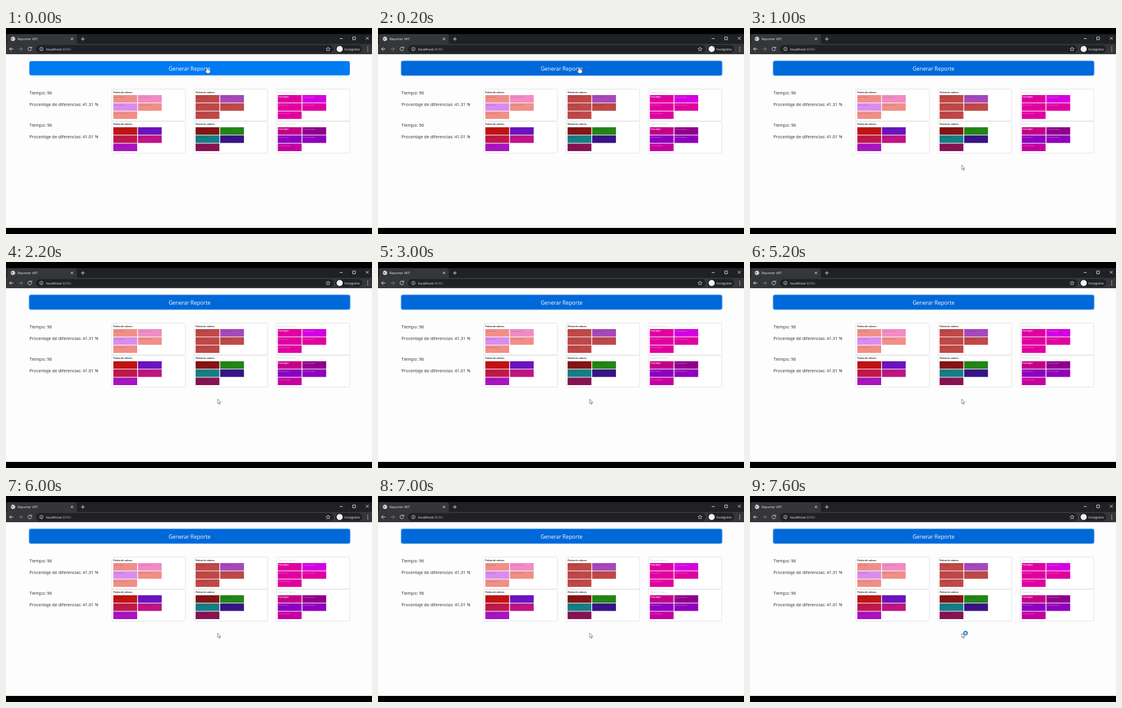
An HTML page for the animation above (8000 ms loop, 600 px wide and 338 px high).

```html
<!DOCTYPE html>
<html lang="es">
<head>
<meta charset="utf-8">
<title>Reporter VRT</title>
<style>
  html, body { margin: 0; width: 100%; height: 100%; overflow: hidden; background: #000; }
  svg { display: block; width: 100%; height: 100%; font-family: "Open Sans", "Noto Sans", sans-serif; }
  .icon { fill: none; stroke: #e4e5e8; stroke-width: .9; }
  .body { font-size: 7.08px; fill: #25292d; }
</style>
</head>
<body>
<svg viewBox="0 0 600 338">
  <rect width="600" height="338"/>
  <rect y="10" width="600" height="18" fill="#202124"/>
  <path d="M0 26Q2 26 2 24V13Q2 10 5 10H113Q116 10 116 13V24Q116 26 118 26H600V43H0Z" fill="#35363a"/>
  <rect y="43" width="600" height="285" fill="#fdfdfd"/>

  <!-- Tab strip -->
  <circle cx="11.5" cy="17.8" r="3.5" fill="#e4e5e8"/>
  <path d="M9 16.2l2 .6 .4 1.7-1.5 .7zM12.4 15l1.8 1.2-1 1.4zM12.3 19l1.5 .2-1.2 1.2z" fill="#4a4b50"/>
  <text x="19" y="19.8" font-size="5.4" fill="#e8eaed">Reporter VRT</text>
  <path class="icon" d="M106.3 16l3.8 3.8m0-3.8l-3.8 3.8M123 18h6m-3-3v6"/>
  <path class="icon" stroke-width=".7" d="M547 17.3h5M568.5 14.8h4.4v4.4h-4.4zM590 14.5l4.6 4.6m0-4.6l-4.6 4.6"/>

  <!-- Toolbar -->
  <rect x="49" y="28" width="488" height="13" rx="6.5" fill="#202124"/>
  <path class="icon" d="M12 34.5H5.8m3-3l-3 3 3 3"/>
  <path class="icon" style="stroke:#85878b" d="M20.8 34.5H27m-3-3l3 3-3 3"/>
  <path class="icon" d="M41.4 32.3A3 3 0 1 0 42 35.2M42.1 30.8v2.3h-2.3"/>
  <circle class="icon" cx="58" cy="34.5" r="2.8" style="stroke-width:.7"/>
  <path class="icon" style="stroke-width:.8" d="M58 32.7v.8m0 .6v2.2"/>
  <text x="65.7" y="36.7" font-size="6.1" fill="#f1f3f4">localhost<tspan fill="#93969b">:8080</tspan></text>
  <path class="icon" style="stroke-width:.7" d="M528 31.2l1 2.2 2.4 .2-1.8 1.6 .5 2.4-2.1-1.3-2.1 1.3 .5-2.4-1.8-1.6 2.4-.2z"/>
  <rect x="540.5" y="28" width="43.5" height="13" rx="6.5" fill="#202124"/>
  <circle cx="547" cy="34.5" r="5" fill="#f1f3f4"/>
  <text x="555" y="36.6" font-size="5.75" fill="#f1f3f4">Incógnito</text>
  <g fill="#e4e5e8"><circle cx="593" cy="31.5" r=".8"/><circle cx="593" cy="34.5" r=".8"/><circle cx="593" cy="37.5" r=".8"/></g>

  <!-- Page -->
  <rect id="ring" x="37.2" y="53.2" width="527.6" height="25.6" rx="3.5" fill="#80bdff"/>
  <rect id="button" x="38.7" y="54.7" width="524.6" height="22.6" rx="2.3" stroke-width=".7"/>
  <text x="301" y="69.6" font-size="8.8" text-anchor="middle" fill="#fff">Generar Reporte</text>
  <g id="report"></g>

  <!-- Pointer -->
  <g id="pointer" stroke="#444" stroke-width=".6" stroke-linejoin="round" fill="#fff">
    <path id="hand" d="M-1 .6Q0-.5 1 .6V3.4Q2 2.8 2.6 3.7Q3.6 3.2 4 4.1Q5.2 3.8 5.2 5V7L4.3 9.2H-.3L-2.8 5.9Q-3-.1+5-1 5.7Z"/>
    <path id="arrow" d="M0 0V7.4L1.7 5.9L2.9 8.6L4 8.1L2.9 5.5H5.1Z"/>
    <circle id="busy" cx="6.2" cy="0" r="2.8" fill="none" stroke="#1d78cf" stroke-width="1.9"/>
  </g>
</svg>
<script>
const $ = id => document.getElementById(id);
const LOOP = 8000, STEP = 200;

const rows = [
  { diff: "41.31", palettes: [
    ["#f08f88", "#f08bc6", "#d98cf0", "#f08f88", "#f08f88"],
    ["#bf4848", "#a648bb", "#bf4848", "#bf4848", "#bf4848"],
    ["#e000a0", "#d400e0", "#e000a0", "#e000a0", "#e000a0"]] },
  { diff: "41.01", palettes: [
    ["#c01414", "#6a14c0", "#c0184a", "#c01484", "#a814c0"],
    ["#861414", "#228614", "#147e86", "#381486", "#861454"],
    ["#c40088", "#90008c", "#8c00c0", "#9000bc", "#c400a0"]] }
];
const labels = ["Fondo página", "Color secundario", "Texto principal", "Texto secundario", "Color secundario"];

function card(colors, x, y, inverted) {
  const swatches = colors.map((color, i) => {
    const sx = x + 2.3 + (i % 2) * 40.3, sy = y + 10 + (i >> 1) * 13.4;
    return `<rect x="${sx}" y="${sy}" width="39" height="12.4" fill="${color}"/>
      <text x="${sx + 1}" y="${sy + 4}" font-size="2.5" font-weight="${inverted && !i ? 700 : 400}"
        fill="${inverted ? "#fff" : "#000"}" opacity="${inverted ? .85 : .5}">${labels[i]}</text>`;
  }).join("");
  return `<rect x="${x}" y="${y + .3}" width="120.4" height="52.2" rx="1.5" fill="#fff" stroke="#dcdcdc" stroke-width=".8"/>
    <text x="${x + 2.4}" y="${y + 6.6}" font-size="3.65" font-weight="${inverted ? 400 : 700}"
      fill="${inverted ? "#c4c4c4" : "#222"}">Paleta de colores</text>${swatches}`;
}

$("report").innerHTML = rows.map(({ diff, palettes }, r) => {
  const y = 100 + r * 52.8;
  return `<text class="body" x="38.6" y="${y + 8.8}">Tiempo: 96</text>
    <text class="body" x="38.6" y="${y + 28}">Procentaje de diferencias: ${diff} %</text>` +
    palettes.map((p, c) => card(p, 173.7 + c * 134.8, y, c === 2)).join("");
}).join("");

$("hand").setAttribute("d", "M-1 .6Q0-.5 1 .6V3.4Q2 2.8 2.6 3.7Q3.6 3.2 4 4.1Q5.2 3.8 5.2 5V7L4.3 9.2H-.3L-2.8 5.9Q-2.4 4.6-1 5.7Z");

const show = (id, on) => $(id).setAttribute("visibility", on ? "visible" : "hidden");

function draw(now) {
  const t = Math.floor((now % LOOP) / STEP) * STEP;
  const p = Math.min(1, Math.max(0, (t - 200) / 600));
  const ease = p * p * (3 - 2 * p);
  const x = 329.5 + 17.5 * ease, y = 65 + 160 * ease;
  const clicked = t >= 200, overButton = y < 78;

  $("button").setAttribute("fill", clicked ? "#0069d9" : "#007bf2");
  $("button").setAttribute("stroke", clicked ? "#0062cc" : "#006fe0");
  show("ring", clicked);
  $("pointer").setAttribute("transform", `translate(${x} ${y})`);
  show("hand", overButton);
  show("arrow", !overButton);
  show("busy", t >= 7600);
  requestAnimationFrame(() => draw(performance.now()));
}
draw(performance.now());
</script>
</body>
</html>
```
